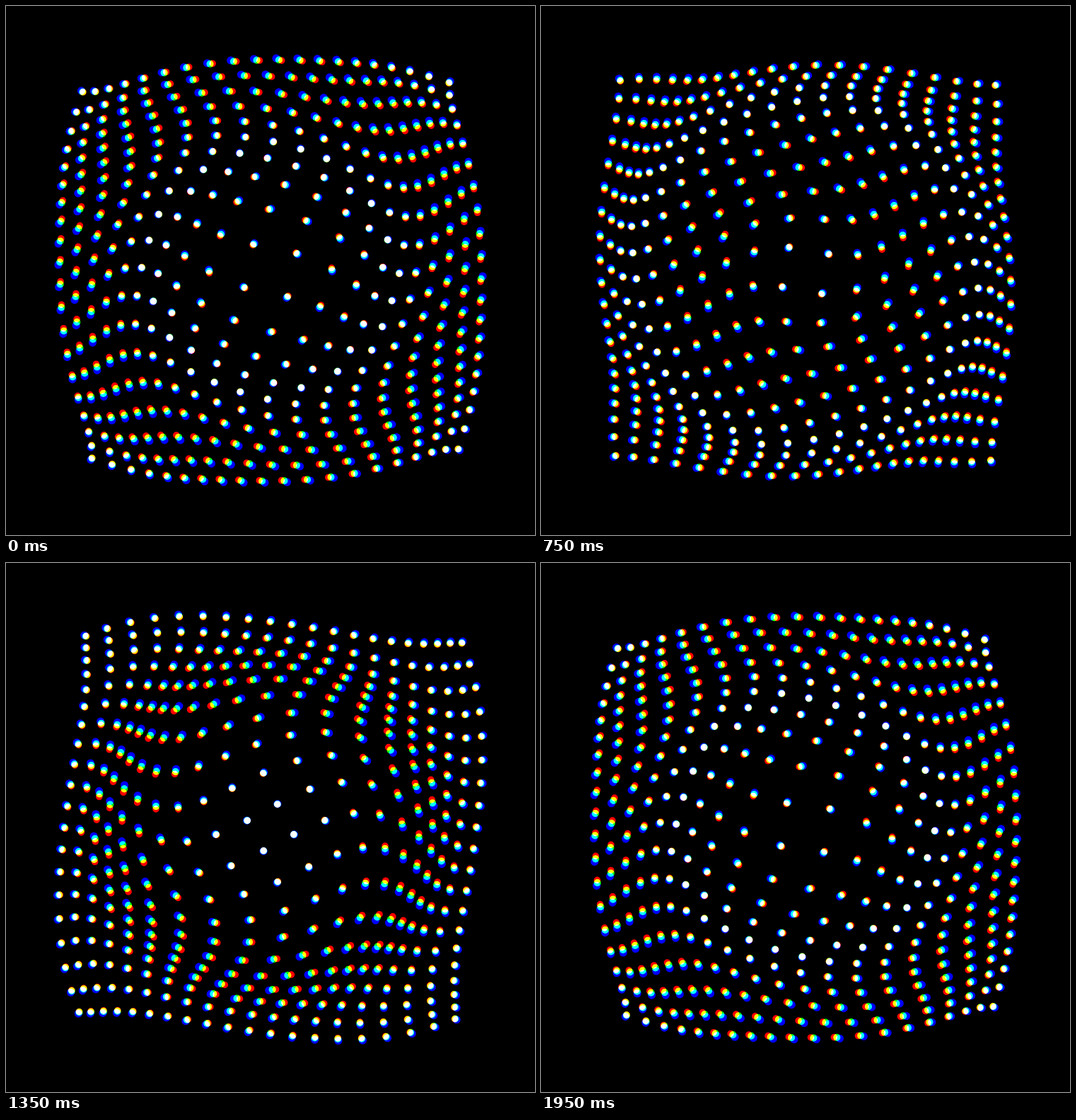
These frames come from a looping animation (748x748 px, 2000 ms). An HTML page with a canvas:

```html
<!DOCTYPE html>
<html lang="en">
<head>
<meta charset="utf-8">
<title>Swirling dots</title>
<style>
  html, body { margin: 0; width: 100%; height: 100%; overflow: hidden; background: #000; }
  canvas { display: block; }
</style>
</head>
<body>
<canvas id="stage" width="748" height="748"></canvas>
<script>
const ctx = document.getElementById('stage').getContext('2d');
const TAU = Math.PI * 2;
const DEG = Math.PI / 180;
const LOOP = 2000, STEP = 50;
const CENTER = 374, COUNT = 20;
const REACH = COUNT / 2 * Math.SQRT2;

// Each channel runs slightly ahead of the previous one.
const channels = [
  { color: '#f00', lead: -4.4 * DEG, scale: 0.998, size: 4.8 },
  { color: '#0f0', lead: 0, scale: 1, size: 5.1 },
  { color: '#00f', lead: 4.4 * DEG, scale: 1.007, size: 5.6 }
];

// Lens bulge: distance in cells to mean radius in pixels.
const bulge = d =>
  20 * d + 104 * (1 - Math.exp(-0.405 * d)) + 3.5 * Math.exp(-(((d - 5.8) / 2) ** 2));

const dots = [];
for (let row = 0; row < COUNT; row++) {
  for (let col = 0; col < COUNT; col++) {
    const x = col - (COUNT - 1) / 2;
    const y = row - (COUNT - 1) / 2;
    const dist = Math.hypot(x, y);
    dots.push({
      dist,
      angle: Math.atan2(y, x),
      radius: bulge(dist),
      swing: 30 * DEG * (1 - dist / REACH)
    });
  }
}

function draw(time) {
  ctx.globalCompositeOperation = 'source-over';
  ctx.fillStyle = '#000';
  ctx.fillRect(0, 0, 748, 748);
  ctx.globalCompositeOperation = 'lighter';
  for (const { color, lead, scale, size } of channels) {
    const phase = TAU * time / LOOP + 13 * DEG + lead;
    ctx.fillStyle = color;
    ctx.beginPath();
    for (const { dist, angle, radius, swing } of dots) {
      const a = angle + swing * Math.sin(phase + 18 * DEG * dist);
      const r = scale * (radius + 5.9 * Math.sin(phase + 45 * DEG * dist));
      const x = CENTER + r * Math.cos(a);
      const y = CENTER + r * Math.sin(a);
      ctx.moveTo(x + size, y);
      ctx.arc(x, y, size, 0, TAU);
    }
    ctx.fill();
  }
}

const start = performance.now();
function tick() {
  const time = (performance.now() - start) % LOOP;
  draw(Math.floor(time / STEP) * STEP);
  requestAnimationFrame(tick);
}
tick();
</script>
</body>
</html>
```
